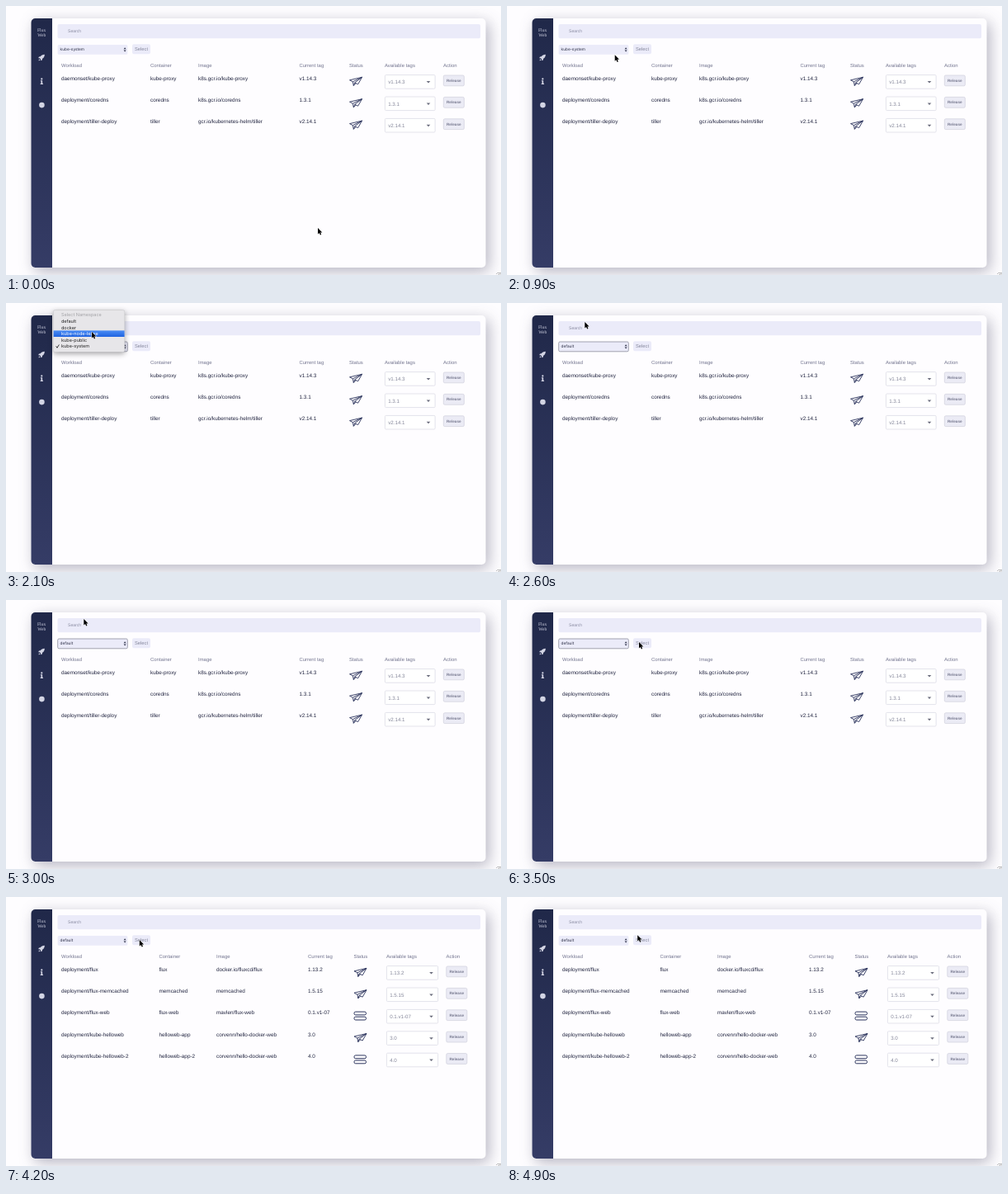
Animation, 600 px wide and 326 px high, one loop 5000 ms. Source, as an HTML page:

```html
<!DOCTYPE html>
<html lang="en">
<head>
<meta charset="utf-8">
<title>Workload dashboard</title>
<style>
html, body { margin: 0; width: 100%; height: 100%; overflow: hidden; background: #fefdff; }
svg { display: block; width: 600px; height: 326px; }
text { font-family: "Liberation Sans", Arial, sans-serif; text-rendering: geometricPrecision; white-space: pre; }
.ui { font-family: Inter, Roboto, sans-serif; }
.logo { font-family: "Liberation Serif", Times, serif; }
.window { filter: drop-shadow(4px 5px 9px rgba(45, 45, 75, .34)); }
.menu { filter: drop-shadow(0 2px 3px rgba(0, 0, 0, .35)); }
</style>
</head>
<body>
<svg id="stage" viewBox="0 0 600 326">
  <defs>
    <linearGradient id="navy" x2="0" y2="1">
      <stop stop-color="#202849"/><stop offset="1" stop-color="#353c66"/>
    </linearGradient>
    <linearGradient id="blue" x2="0" y2="1">
      <stop stop-color="#4a8cf5"/><stop offset="1" stop-color="#2063e0"/>
    </linearGradient>
    <g id="plane" fill="none" stroke="#2b335c" stroke-width=".9" stroke-linejoin="round">
      <path d="M.5 4 15.5.5 10.7 9 6.6 7.2 15.5.5 4.4 6Z M4.4 6 5.3 10.7 6.6 7.2 M5.3 10.7 8 7.9"/>
    </g>
    <g id="bars" fill="none" stroke="#2b335c" stroke-width="1">
      <rect x=".5" y=".5" width="14.5" height="3.8" rx="1.7"/>
      <rect x=".5" y="6.6" width="14.5" height="3.8" rx="1.7"/>
    </g>
  </defs>
  <rect class="window" x="30.5" y="15" width="551" height="302" rx="5" fill="#fefdff"/>
  <path d="M56 15V317H35.5a5 5 0 0 1-5-5V20a5 5 0 0 1 5-5Z" fill="url(#navy)"/>
  <g fill="#d3d5e4">
    <text class="logo" x="38" y="31.2" font-size="5.6">Flux</text>
    <text class="logo" x="38.3" y="37.2" font-size="5.5">Web</text>
    <path d="M46.8 58.7c-2.5 0-4 .9-5.2 2.6l-1.6.3-.9 1.6 1.7.1 1.3 1.3.1 1.7 1.6-.9.3-1.6c1.8-1.2 2.7-2.7 2.7-5.1ZM40.6 64.4c-.8.3-1 1-1 1.8.8 0 1.5-.2 1.8-1Z"/>
    <circle cx="43.3" cy="88.4" r="1.1"/>
    <path d="M41.8 90.2h2.3v3.6h.8v1.1h-3.2v-1.1h.8v-2.5h-.7Z"/>
    <circle cx="43.4" cy="120.1" r="3.3"/>
  </g>
  <rect x="62.5" y="22" width="512.5" height="17.3" rx="2" fill="#ebebf9"/>
  <text x="75" y="32.4" font-size="5.1" fill="#8a8ca2">Search</text>

  <rect id="picker" x="62.7" y="47" width="84.6" height="11.8" rx="1.5" fill="#ebebf9" stroke-width=".8"/>
  <text id="choice" class="ui" x="65.6" y="54.4" font-size="4.75" fill="#2b2e45"></text>
  <path d="M142.6 52.3l1.5-2 1.5 2ZM142.6 53.5l1.5 2 1.5-2Z" fill="#33364e"/>
  <rect id="button" x="153" y="46.3" height="12" rx="2" fill="#ebebf9"/>
  <text id="label" x="156" y="54.3" font-size="5.75" fill="#85879c"></text>

  <g id="tables"></g>
  <g id="menu">
    <rect class="menu" x="57.4" y="8.6" width="86.4" height="51" rx="2" fill="#e7e6e9" stroke="#b9b8bd" stroke-width=".4"/>
    <rect id="bar" x="57.6" width="86" height="7.65" fill="url(#blue)"/>
    <g id="items"></g>
    <path id="check" d="M60.7 52.4l1.3 1.9 2.3-3.8" fill="none" stroke-width=".9"/>
  </g>
  <path d="M594 325l1.5-1.5h4.5M596 326l2-1h2" fill="none" stroke="#aaa" stroke-width=".8"/>
  <path id="cursor" d="M0 0V7.4L1.7 5.9 2.9 8.6 4.2 8 3 5.4H5.3Z" fill="#000" stroke="#fff" stroke-width=".8" paint-order="stroke"/>
</svg>
<script>
const $ = id => document.getElementById(id);
const set = (el, attrs) => { for (const k in attrs) el.setAttribute(k, attrs[k]); };
const show = (el, on) => { el.style.display = on ? "" : "none"; };
const text = (x, y, size, fill, s, more = "") =>
  `<text x="${x}" y="${y}" font-size="${size}" fill="${fill}" ${more}>${s}</text>`;

const heads = ["Workload", "Container", "Image", "Current tag", "Status", "Available tags", "Action"];

// cols: left edge of each column; rows: workload, container, image, tag, icon
function table(cols, width, rows) {
  let out = heads.map((h, i) => text(cols[i], 73.6, 5.95, "#73758f", h)).join("");
  rows.forEach((row, r) => {
    const y = 26.4 * r, [, , , , icon, pick, action] = cols;
    for (let i = 0; i < 4; i++) out += text(cols[i], 89.5 + y, 6.38, "#20243f", row[i]);
    const arrow = pick + width - 8.5;
    out += `<use href="#${row[4] || "plane"}" x="${icon}" y="${85.8 + y}"/>
      <rect x="${pick + .4}" y="${83.6 + y}" width="${width - .8}" height="16.6" rx="1.2" fill="#fff" stroke="#dcdce6" stroke-width=".8"/>
      ${text(pick + 4.2, 94.2 + y, 6.2, "#85879a", row[3])}
      <path d="M${arrow - 2.3} ${91 + y}h4.6l-2.3 2.5Z" fill="#6b6d7d"/>
      <rect x="${action + .3}" y="${84 + y}" width="25" height="12.8" rx="1.5" fill="#ebebf5" stroke="#cfcfdc" stroke-width=".7"/>
      ${text(action + 4, 92 + y, 4.65, "#77798f", "Release", 'font-weight="bold"')}`;
  });
  return `<g>${out}</g>`;
}

$("tables").innerHTML = table([67, 175, 233, 355.5, 416, 459, 530], 61.5, [
  ["daemonset/kube-proxy", "kube-proxy", "k8s.gcr.io/kube-proxy", "v1.14.3"],
  ["deployment/coredns", "coredns", "k8s.gcr.io/coredns", "1.3.1"],
  ["deployment/tiller-deploy", "tiller", "gcr.io/kubernetes-helm/tiller", "v2.14.1"]
]) + table([67, 185.5, 255, 366, 421.5, 461, 533.5], 63, [
  ["deployment/flux", "flux", "docker.io/fluxcd/flux", "1.13.2"],
  ["deployment/flux-memcached", "memcached", "memcached", "1.5.15"],
  ["deployment/flux-web", "flux-web", "mavlen/flux-web", "0.1.v1-07", "bars"],
  ["deployment/kube-helloweb", "helloweb-app", "corvenn/hello-docker-web", "3.0"],
  ["deployment/kube-helloweb-2", "helloweb-app-2", "corvenn/hello-docker-web", "4.0", "bars"]
]);
const [before, after] = $("tables").children;

const itemTop = 10.4, itemStep = 7.65;
$("items").innerHTML = ["Select Namespace", "default", "docker", "kube-node-lease", "kube-public", "kube-system"]
  .map((s, i) => text(67, itemTop + itemStep * i + 5.8, 5.5, "#222", s, 'class="ui"')).join("");
const items = [...$("items").children];

// Pointer path: time, x, y
const path = [
  [0, 378, 269], [100, 300, 190], [200, 165, 87], [300, 165, 87], [400, 148, 73], [600, 136, 63],
  [900, 130.7, 59.3], [1100, 130, 54], [1800, 130, 54], [2000, 115, 43], [2100, 104, 35],
  [2200, 98, 29], [2400, 94.3, 23], [3000, 94.3, 23], [3100, 98, 25], [3300, 134, 40],
  [3500, 160, 51], [3600, 161.8, 52], [4700, 161.8, 52], [4900, 158.2, 46.2], [5000, 158.2, 46.2]
];

function pointer(t) {
  const i = path.findIndex(p => p[0] > t);
  const [t0, x0, y0] = path[i - 1], [t1, x1, y1] = path[i];
  const k = (t - t0) / (t1 - t0);
  return [x0 + (x1 - x0) * k, y0 + (y1 - y0) * k];
}

function draw(now) {
  const t = Math.floor(now % 5000 / 100) * 100;
  const [x, y] = pointer(t);
  set($("cursor"), { transform: `translate(${x} ${y})` });

  const open = t >= 1100 && t < 2600;
  show($("menu"), open);
  if (open) {
    const active = Math.floor((y - itemTop) / itemStep);
    set($("bar"), { y: itemTop + itemStep * active });
    items.forEach((el, i) => set(el, { fill: i === active ? "#fff" : i ? "#222" : "#a3a3a7" }));
    set($("check"), { stroke: active === 5 ? "#fff" : "#222" });
  }

  set($("picker"), { stroke: t >= 1100 && t < 3600 ? "#8b8d9c" : "none" });
  $("choice").textContent = t < 2600 ? "kube-system" : "default";

  const loading = t >= 3700 && t < 4100;
  set($("button"), { width: loading ? 57.8 : 22 });
  $("label").textContent = loading ? "Loading, please wait" : "Select";

  show(before, t < 4100);
  show(after, t >= 4100);
}

const start = performance.now();
function tick() {
  draw(performance.now() - start);
  requestAnimationFrame(tick);
}
tick();
</script>
</body>
</html>
```
